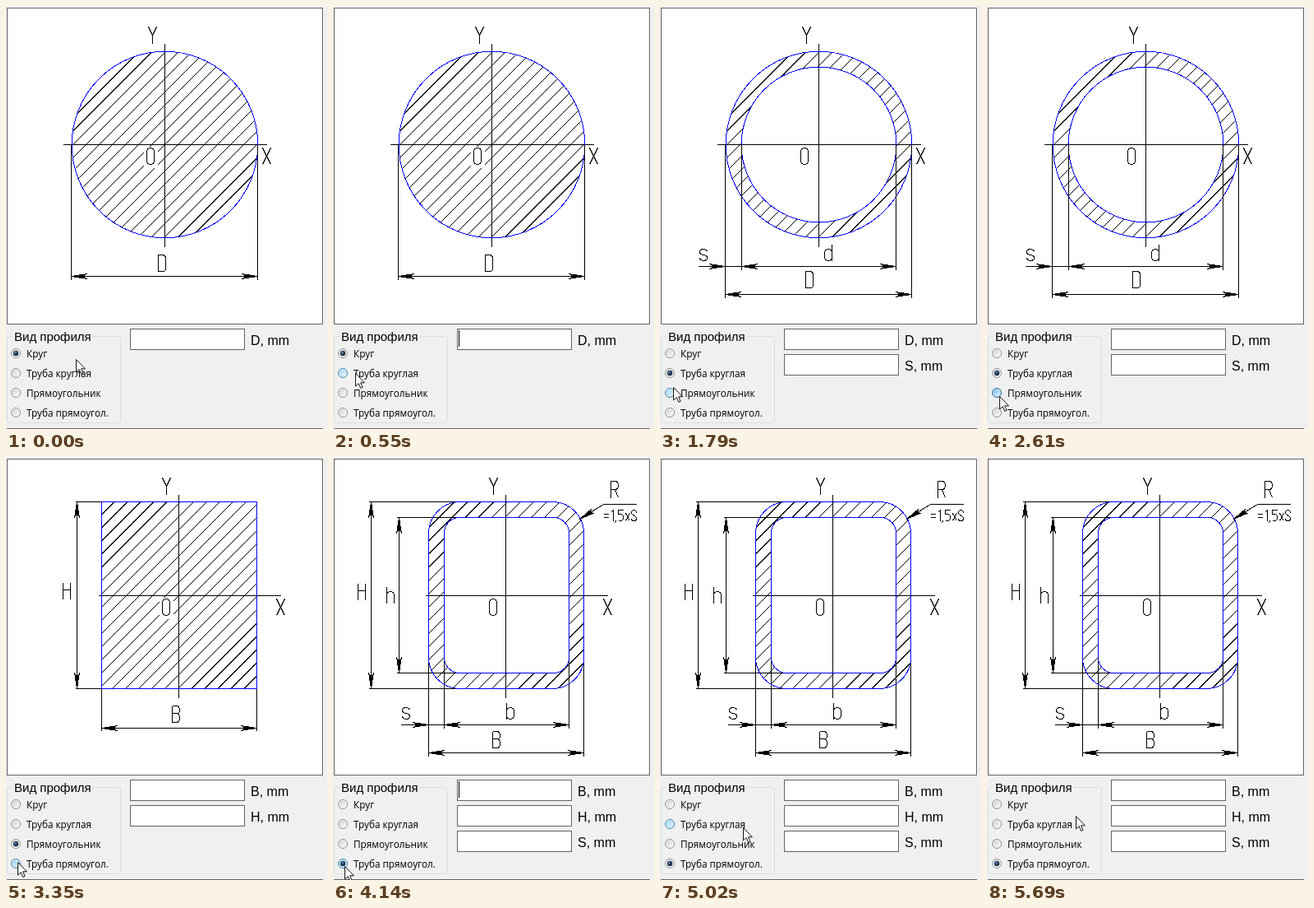
These frames come from a looping animation (391 px wide and 514 px high, 6060 ms). An HTML page:

```html
<!DOCTYPE html>
<html lang="ru">
<head>
<meta charset="utf-8">
<title>Вид профиля</title>
<style>
  html, body { margin: 0; width: 100%; height: 100%; overflow: hidden; background: #f0f0f0; }
  svg { display: block; width: 391px; height: 514px; }
  .crisp { shape-rendering: crispEdges; }
  .plan path, .plan circle { fill: none; stroke: #000; stroke-width: 1; }
  .plan .edge { stroke: #00f; }
  .plan .tip { fill: #000; }
  .plan .gap { fill: #fff; }
  .title { font: 15px "Liberation Sans", Arial, sans-serif; }
  .unit { font: 16px "Liberation Sans", Arial, sans-serif; }
  .option { font: 11.75px "Open Sans", "Noto Sans", sans-serif; }
  .box { fill: #fff; stroke: #646464; }
  .rim { fill: #f6f6f6; stroke: #8e8f8f; }
  .well { fill: url(#well); }
  .hover .rim { fill: #def6fb; stroke: #3c7fb1; }
  .hover .well { fill: url(#wellHover); }
  .press .rim { fill: #c2e4f6; stroke: #2c628b; }
  .press .well { fill: url(#wellPress); }
  .dot { fill: url(#dot); }
</style>
</head>
<body>
<svg viewBox="0 0 391 514" xmlns="http://www.w3.org/2000/svg">
  <defs>
    <linearGradient id="well" x2="1" y2="1"><stop stop-color="#cdd1d5"/><stop offset="1" stop-color="#fbfbfb"/></linearGradient>
    <linearGradient id="wellHover" x2="1" y2="1"><stop stop-color="#9fd5f3"/><stop offset="1" stop-color="#e7f6fd"/></linearGradient>
    <linearGradient id="wellPress" x2="1" y2="1"><stop stop-color="#7cc3f5"/><stop offset="1" stop-color="#e0f0fd"/></linearGradient>
    <radialGradient id="dot" cx=".4" cy=".35" r=".7"><stop stop-color="#6b88a8"/><stop offset=".5" stop-color="#24405f"/><stop offset="1" stop-color="#14222f"/></radialGradient>
  </defs>
  <rect width="391" height="514" fill="#f0f0f0"/>
  <rect class="box crisp" x="1.5" y="2.5" width="384" height="384"/>
  <path class="crisp" d="M1 513.5H386" stroke="#646464"/>
  <g id="plans" class="crisp" transform="translate(.5 .5)"></g>
  <rect x="1.5" y="401.5" width="138" height="105" rx="3" fill="none" stroke="#d5dfe5"/>
  <rect x="8" y="396" width="97" height="12" fill="#f0f0f0"/>
  <text class="title" x="10" y="407">Вид профиля</text>
  <g id="options"></g>
  <g id="fields"></g>
  <path id="caret" class="crisp" d="M153.5 394V414" stroke="#000"/>
  <path id="cursor" d="M.5 .5V16L4.2 12.6 6.7 18.4 9 17.4 6.6 11.8H11.4Z" fill="#fff" stroke="#111"/>
</svg>
<script>
const $ = id => document.getElementById(id);
const LOOP = 6060;

// Single-stroke drawing letters on a 9 by 20 cell
const GLYPHS = {
  D: 'M0 0H5Q9 0 9 4V16Q9 20 5 20H0Z',
  O: 'M0 5Q0 0 4.5 0Q9 0 9 5V15Q9 20 4.5 20Q0 20 0 15Z',
  X: 'M0 0L10 20M10 0L0 20',
  Y: 'M0 0L5 10V20M10 0L5 10',
  H: 'M0 0V20M9 0V20M0 9H9',
  B: 'M0 0H5Q9 0 9 5Q9 9 5 9H0M5 9Q9 9 9 14Q9 20 5 20H0V0',
  R: 'M0 20V0H5Q9 0 9 5Q9 10 5 10H0M5 10L9 20',
  d: 'M9 0V20M9 11Q9 6 4.5 6Q0 6 0 11V15Q0 20 4.5 20Q9 20 9 15',
  b: 'M0 0V20M0 11Q0 6 4.5 6Q9 6 9 11V15Q9 20 4.5 20Q0 20 0 15',
  h: 'M0 0V20M0 11Q0 6 4.5 6Q9 6 9 11V20',
  s: 'M9 9Q8 6 4.5 6Q0 6 0 9.5Q0 12 4.5 13Q9 14 9 16.5Q9 20 4.5 20Q1 20 0 17'
};
const NOTE = 'M329 69h6m-6 4h6M338 67l3-3v13M344 76v1l-1 3M353 64h-6v5h3q3 0 3 4t-3 4h-3' +
  'M356 68l5 9m0-9l-5 9M369 67q0-3-3-3t-3 3q0 2 3 3.5t3 3.5q0 3-3 3t-3-3';

const line = (d, cls = '') => `<path class="${cls}" d="${d}"/>`;
const glyph = (c, x, y) => `<path d="${GLYPHS[c]}" transform="translate(${x} ${y})"/>`;
const arrow = (x, y, deg) =>
  `<path class="tip" d="M0 0L-18 -2.7L-15 0L-18 2.7Z" transform="translate(${x} ${y}) rotate(${deg})"/>`;
const dimH = (y, a, b) => line(`M${a} ${y}H${b}`) + arrow(a, y, 180) + arrow(b, y, 0);
const dimV = (x, a, b) => line(`M${x} ${a}V${b}`) + arrow(x, a, -90) + arrow(x, b, 90);
const drops = (y, to, ...xs) => line(xs.map(x => `M${x} ${y}V${to}`).join(''));
const disc = (r, x = 193, y = 168) =>
  `M${x - r} ${y}a${r} ${r} 0 1 0 ${2 * r} 0a${r} ${r} 0 1 0 ${-2 * r} 0Z`;
const round = (x, y, w, h, r) =>
  `M${x + r} ${y}h${w - 2 * r}a${r} ${r} 0 0 1 ${r} ${r}v${h - 2 * r}a${r} ${r} 0 0 1 ${-r} ${r}` +
  `h${2 * r - w}a${r} ${r} 0 0 1 ${-r} ${-r}v${2 * r - h}a${r} ${r} 0 0 1 ${r} ${-r}Z`;

// 45 degree hatching through the section centre
const STEP = 16.04;
function hatch(cx) {
  let d = '';
  for (let k = -14; k <= 14; k++) {
    const c = cx + 168 + k * STEP;
    d += `M${c - 290} 290L${c - 45} 45`;
  }
  return line(d);
}
let clips = 0;
function section(d, cx) {
  const id = 'clip' + clips++;
  return `<clipPath id="${id}"><path clip-rule="evenodd" d="${d}"/></clipPath>` +
    `<g clip-path="url(#${id})">${hatch(cx)}</g>`;
}
const gap = x => `<rect class="gap" x="${x - 4}" y="170" width="17" height="26"/>`;
const axes = (x, left, right) =>
  line(`M${x} 45V292M${left} 168H${right}`) +
  glyph('Y', x - 20, 25) + glyph('X', right - 5, 172);

const ring = disc(113.3) + disc(94.4);
const block = 'M116 54H305V281H116Z';
const tube = round(116, 54, 189, 227, 38) + round(135, 73, 152, 189, 19);

const plans = [
  section(disc(113.3), 193) + gap(171) + axes(193, 69, 317) + glyph('O', 171, 172) +
    line(disc(113.3), 'edge') +
    drops(168, 332, 79, 306) + dimH(328, 79, 306) + glyph('D', 185, 302),

  section(ring, 193) + axes(193, 69, 317) + glyph('O', 171, 172) + line(ring, 'edge') +
    drops(168, 354, 79, 306) + drops(168, 320, 99, 287) +
    line('M46 316H99') + arrow(79, 316, 0) + dimH(316, 99, 287) + dimH(350, 79, 306) +
    glyph('s', 48, 289) + glyph('d', 200, 289) + glyph('D', 177, 322),

  section(block, 210) + gap(190) + axes(210, 112, 334) + glyph('O', 190, 172) +
    line('M84 54H116M84 281H116') + line(block, 'edge') +
    drops(281, 332, 116, 305) + dimV(86, 54, 281) + dimH(329, 116, 305) +
    glyph('H', 69, 152) + glyph('B', 202, 302),

  section(tube, 210) + axes(210, 112, 334) + glyph('O', 190, 172) +
    line('M43 54H154M43 281H154M77 73H154M77 262H154') +
    drops(243, 363, 116, 305) + drops(243, 329, 135, 287) + line(tube, 'edge') +
    dimV(46, 54, 281) + dimV(80, 73, 262) +
    line('M82 325H135') + arrow(116, 325, 0) + dimH(325, 135, 287) + dimH(359, 116, 305) +
    line('M300 75L329 57H369') + arrow(300, 75, 148) + line(NOTE) +
    glyph('H', 30, 153) + glyph('h', 65, 157) + glyph('s', 84, 298) +
    glyph('b', 211, 298) + glyph('B', 194, 333) + glyph('R', 338, 29)
];
$('plans').innerHTML = plans.map(p => `<g class="plan">${p}</g>`).join('');

const options = [['Круг', 52], ['Труба круглая', 107], ['Прямоугольник', 117], ['Труба прямоугол.', 127]];
const optionY = i => 422 + 24 * i;
$('options').innerHTML = options.map(([name], i) =>
  `<g><g transform="translate(12 ${optionY(i)})"><circle class="rim" r="5.5"/>` +
  `<circle class="well" r="4"/><circle class="dot" r="3.2"/></g>` +
  `<text class="option" x="25" y="${optionY(i) + 5}">${name}</text></g>`).join('');

const units = ['D', 'DS', 'BH', 'BHS'];
$('fields').innerHTML = [0, 1, 2].map(i =>
  `<g><rect class="box crisp" x="151.5" y="${392.5 + 31 * i}" width="139" height="25"/>` +
  `<text class="unit" x="298" y="${412 + 31 * i}"></text></g>`).join('');

const planEls = [...$('plans').children];
const optionEls = [...$('options').children];
const fieldEls = [...$('fields').children];

const picks = [1150, 2680, 4140];
const presses = [970, 2530, 4020];
const caretOn = [[190, 730], [1150, 1660], [2170, 2610], [2680, 3170], [3660, 4650], [5200, 5690]];
// first step, last step, step count, x, y
const moves = [
  [60, 620, 10, 20, 448], [670, 730, 2, 18, 447], [1340, 1340, 1, 17, 447],
  [1600, 1980, 7, 15, 474], [3110, 3470, 7, 14, 497], [4450, 5020, 10, 101, 450],
  [5080, 5200, 3, 108, 437], [5510, 5510, 1, 108, 436]
];

function pointer(t) {
  let x = 85, y = 429;
  for (const [from, to, n, tx, ty] of moves) {
    if (t < from) break;
    const gapMs = (to - from) / (n - 1) || 1;
    const p = Math.min(n, Math.floor((t - from + 3) / gapMs) + 1) / n;
    const e = p * p * (3 - 2 * p);
    x += (tx - x) * e;
    y += (ty - y) * e;
  }
  return [Math.round(x), Math.round(y)];
}

const show = (el, on) => { el.style.display = on ? '' : 'none'; };

function draw(t) {
  const [x, y] = pointer(t);
  const chosen = picks.filter(p => t >= p).length;
  $('cursor').setAttribute('transform', `translate(${x} ${y})`);
  show($('caret'), caretOn.some(([a, b]) => t >= a && t < b));
  planEls.forEach((el, i) => show(el, i === chosen));
  optionEls.forEach((el, i) => {
    const over = x < options[i][1] && Math.abs(y - optionY(i)) < 10;
    const down = i > 0 && t >= presses[i - 1] && t < picks[i - 1];
    el.setAttribute('class', down ? 'press' : over ? 'hover' : '');
    show(el.querySelector('.dot'), i === chosen);
  });
  fieldEls.forEach((el, i) => {
    const unit = units[chosen][i];
    show(el, unit);
    if (unit) el.lastChild.textContent = unit + ', mm';
  });
}

const start = performance.now();
function tick() {
  draw((performance.now() - start) % LOOP);
  requestAnimationFrame(tick);
}
tick();
</script>
</body>
</html>
```
